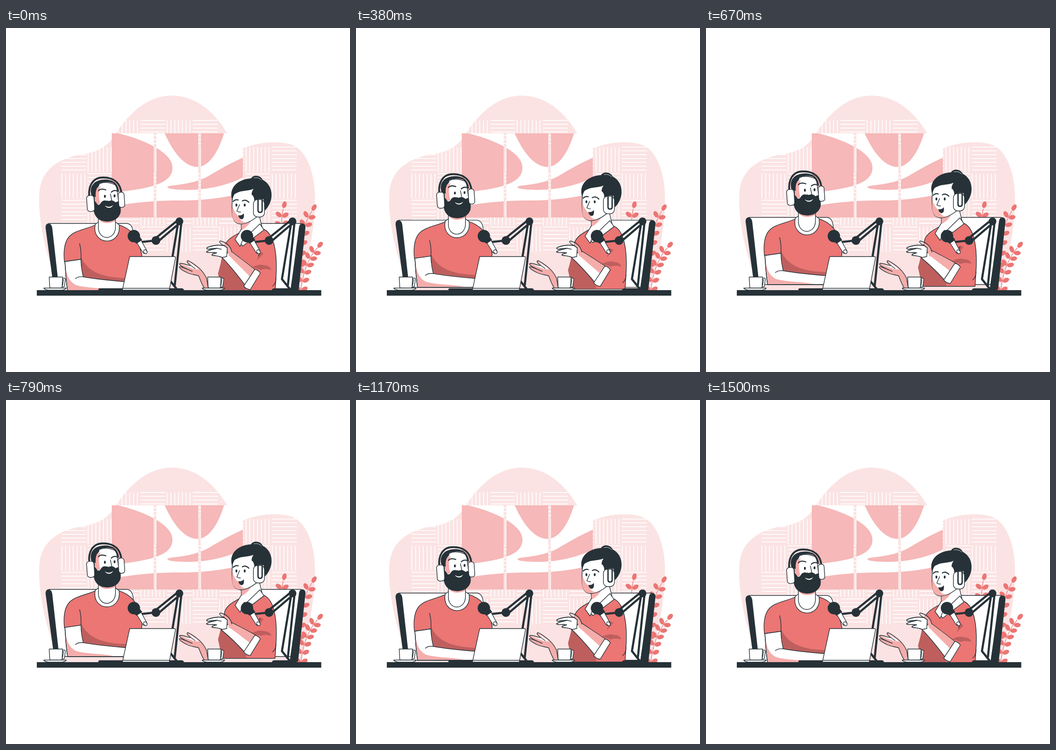
These frames come from a looping animation (748 px wide and 748 px high, 1540 ms). An HTML page:

```html
<!DOCTYPE html>
<html lang="en">
<head>
<meta charset="utf-8">
<title>Podcast</title>
<style>
html, body { margin: 0; width: 100%; height: 100%; overflow: hidden; background: #fff; }
svg { display: block; width: 100%; height: 100%; }
.ink { fill: #263238; }
.coral { fill: #eb7674; }
.deep { fill: #be5f5e; }
.blush { fill: #f5adab; }
.pale { fill: #fbe3e3; }
.art { fill: #f6b8b8; }
.white { fill: #fff; }
.line { stroke: #263238; stroke-width: 1.4; stroke-linejoin: round; stroke-linecap: round; }
.open { fill: none; }
.brow { stroke-width: 2.3; }
.thick { stroke-width: 3; }
.bar { stroke-width: 4.6; }
</style>
</head>
<body>
<svg viewBox="0 0 748 748">
  <defs>
    <path id="blob" d="M115 565C88 500 67 415 73 353C79 306 115 285 158 276C205 270 223 255 239 229C265 190 305 147 360 147C415 147 455 185 481 229L515 262C550 247 595 245 622 254C656 267 672 320 672 370C672 440 655 510 640 570H115Z"/>
    <clipPath id="blobClip"><use href="#blob"/></clipPath>
    <clipPath id="canvases"><path d="M230 229h91v183h-91zM327 229h91v183h-91zM424 229h91v183h-91z"/></clipPath>

    <g id="cup" class="line white">
      <path d="M120 544h7q2 0 2 3l-2 14q0 2-3 2h-4M121 547h4l-2 13h-3"/>
      <path d="M94 541.500h29l-1 21q0 3-4 3H99q-4 0-4-3Z"/>
      <path d="M82 565.500h49q-3 4-9 4.500H92q-7-.5-10-4.500Z"/>
    </g>

    <g id="mic">
      <path class="ink" d="M332 570q1-4 6-4h44q4 0 5 4Z"/>
      <path class="line open bar" d="M374 425L354 546L370 566M381 426L367 559"/>
      <path class="line open bar" d="M376 416L324 458M378 424L332 463M326 462L288 466"/>
      <path class="line white" d="M280 460l10-5 16 29q2 5-3 6q-4 1-6-3Z"/>
      <ellipse class="line white" cx="303" cy="486.500" rx="4.500" ry="3.500" transform="rotate(55 303 486.500)"/>
      <circle class="ink" cx="278" cy="452.500" r="13.500"/>
      <path class="ink" d="M277 464l15-9 4 6-12 8Z"/>
      <circle class="ink" cx="377" cy="420.500" r="8.500"/>
      <circle class="ink" cx="326" cy="462" r="9.500"/>
    </g>
  </defs>

  <use href="#blob" class="pale"/>
  <path id="wall" clip-path="url(#blobClip)" fill="none" stroke="#fff" stroke-width="1.800"/>
  <g clip-path="url(#canvases)">
    <path class="white" d="M230 229h285v183H230Z"/>
    <g class="art">
      <path d="M230 229H244C300 243 362 270 362 304C362 339 310 350 230 358Z"/>
      <path d="M345 229H474C465 260 445 302 416 302C385 302 360 263 345 229Z"/>
      <path d="M351 346C352 340 400 344 440 322C470 304 490 293 515 282V325C480 344 430 352 400 352C370 352 352 350 351 346Z"/>
      <path d="M230 388C285 378 330 375 380 375C430 375 480 369 515 358V412H230Z"/>
    </g>
  </g>

  <g id="plant" class="coral" stroke="#eb7674"></g>

  <g class="lift">
    <path class="line white" d="M93 425H262Q273 425 276 440L292 571H112Z"/>
    <path class="ink" d="M86 434Q86 425 93 425Q99 426 100.500 434L117 582H106Z"/>

    <path class="line coral" d="M197 427C178 437 150 439 137 454C126 467 125 488 127 508L163 503L168 571H290L296 497C290 470 284 440 245 428Z"/>
    <path class="deep" d="M163 497C176 530 210 543 262 544V553L168 541Z"/>
    <path class="line white" d="M128 508C130 530 130 548 134 571H262V552C225 549 190 545 168 541Q163 520 163 503Z"/>
    <path class="blush" d="M129 509C130 532 134 549 152 559C175 566 205 564 235 570H135Q130 540 129 509Z"/>
    <path class="line open" d="M163 503Q164 484 160 469M128 508C130 530 130 548 134 571H262M151 545Q156 540 168 541"/>

    <path class="line white" d="M194 427C185 474 252 476 246 428L238 422H201Z"/>
    <path class="line white" d="M201 400V430C198 464 240 464 238 430V400Z"/>
    <path class="blush" d="M202 405H237V420Q215 430 202 417Z"/>

    <path class="line white" d="M194 345Q212 328 240 342L246 385Q240 408 215 408L192 385Z"/>
    <path class="blush" d="M194 350L206 344Q199 358 205 382L193 385Z"/>
    <path class="line open" style="stroke-width:4" d="M181 366C179 344 188 325 211 325C236 325 249 338 251 360"/>
    <path class="ink" d="M187 367C178 344 193 329.500 215 329.500C235 329.500 245 340 246 358C241 352 239 342 233 337Q217 332 203 338Q204 343 198 348Q194 355 195 367Z"/>
    <path class="ink" d="M190 374Q195 377 199 384Q204 386 207 379Q213 372 222 377Q231 372 238 379Q242 378 246 375Q251 390 249 402Q243 420 220 421Q192 420 190 392Z"/>
    <path class="white" d="M215 386Q224 392 233 385Q230 391 224 391Q218 391 215 386Z"/>
    <path class="line open" d="M227 361L230 375Q227 379 220 376"/>
    <path class="line open brow" d="M201 354Q206 348 217 352M229 357Q235 351 243 355"/>
    <ellipse class="ink" cx="215" cy="366" rx="2" ry="3.200"/>
    <ellipse class="ink" cx="236" cy="365" rx="2" ry="3.200"/>
    <rect class="line white" x="176" y="364" width="16" height="35" rx="6" transform="rotate(-4 184 381)"/>
    <rect class="line white" x="244.500" y="357" width="13" height="33" rx="5.500" transform="rotate(-4 251 373)"/>
  </g>

  <g id="restingHand">
    <path class="line blush" d="M441 572L436 544C431 533 423 524 415 518C407 512 398 506 395 506C391 508 398 515 404 518C395 516 383 510 378 512C375 515 385 520 393 524C384 521 377 517 377 520C379 525 386 528 392 531C400 536 410 536 419 539C423 550 428 562 434 570Z"/>
    <path class="white" d="M397 507.500L414 520L420 525L408 524L380 513L393 516L405 518Z"/>
    <path class="line open" d="M404 518L411 523M393 524L405 529"/>
  </g>

  <g class="lift">
    <path class="line white" d="M545 425H642L619 571H545Z"/>
    <path class="ink" d="M637 434Q638 425 645 425Q652 426 651 435L635 582H617Z"/>

    <path class="line coral" d="M508 445C493 453 481 460 476 472L463 535L470 575H585L587 545C590 500 586 449 561 438Z"/>
    <path class="deep" d="M470 500L461 534L470 574H523L518 553Z"/>
    <path class="deep" d="M535 520Q551 512 561 516Q574 516 577 526Q563 522 554 526ZM553 486L545 506L560 490Z"/>
    <path class="line open" d="M587 543Q587 556 580 561M552 488L549 496"/>

    <path class="line white" d="M511 420L512 437L501 459L515 474L540 455L558 438L550 405Z"/>
    <path class="blush" d="M512 424L535 416Q528 431 513 439Z"/>
    <path class="line white" d="M512 437L498 460L509 475L518 453M552 426L561 439L536 458L524 453Z"/>

    <path class="line white" d="M493 362C490 395 491 412 497 420C505 430 522 427 538 416L560 400L556 360L529 345Z"/>
    <path class="blush" d="M492 386Q497 404 507 410Q511 425 524 422Q504 430 496 419Q490 412 492 386Z"/>
    <path class="ink" d="M492 375C482 345 508 328 533 327C537 319 553 319 558 330C582 342 584 376 563 397L560 372H547L540 382Q541 366 534 362Q534 355 539 349C530 355 510 353 499 359Q494 364 492 375Z"/>
    <path fill="none" stroke="#fff" stroke-width=".8" d="M539 326Q550 324 556 331"/>
    <ellipse class="ink" cx="501" cy="385" rx="2" ry="3.200"/>
    <ellipse class="ink" cx="519" cy="385" rx="2" ry="3.200"/>
    <path class="line open brow" d="M494 377Q499 372 505 374M514 376Q521 372 528 379"/>
    <path class="line open" d="M508 384L502 398Q505 401 510 400"/>
    <path class="ink" d="M505 407Q512 409 517 403Q519 415 512 416Q507 415 505 407Z"/>
    <rect class="line white" x="538" y="373" width="24" height="38" rx="9"/>
    <path class="line open thick" d="M548 372V396Q548 401 552.500 401Q557 401 557 396V372"/>
  </g>

  <g id="forearm">
    <path class="line white" d="M489 485Q515 505 545 528L524 565Q495 525 468 497Z"/>
    <path class="blush" d="M482 477L489 486Q515 505 544 528L535 545Q505 515 484 494Z"/>
  </g>
  <path class="line white lift" d="M541 525Q549 526 553 533L531 569Q522 568 517 561Z"/>
  <path class="white" d="M474 473L480 490L484 496L470 499L456 486Z"/>
  <path class="blush" d="M472 467Q487 472 491 487L487 498L479 477Z"/>
  <path class="line white" d="M446 480C438 482 434 480 438 477C448 473 460 471 474 473L481 478L480 497L470 499C463 495 456 496 448 494C447 492 452 490 458 489C449 487 440 490 436 487C437 484 450 481 459 479Z" stroke="none"/>
  <path class="line open" d="M491 487C488 474 479 466 466 463C462 465 467 470 474 473C460 471 448 473 438 477C434 480 438 482 446 480L459 479C450 481 437 484 436 487C440 490 449 487 458 489C452 490 447 492 448 494C456 496 463 495 470 499M474 473L481 478M459 479L468 481"/>

  <use href="#mic"/>
  <use href="#mic" x="246"/>
  <path class="ink" d="M201 567Q202 566 205 566H355V571H201Z"/>
  <path class="line white" d="M269 497H366Q369 497 368.500 500L355 570H253Z"/>
  <path class="line open" d="M254 566H356"/>
  <use href="#cup"/>
  <use href="#cup" x="344.500"/>
  <rect class="ink" x="67" y="570" width="618.500" height="12"/>
</svg>
<script>
const byId = id => document.getElementById(id);

// Checkered wall tiles: horizontal and vertical stripes in turn.
// The top row is narrower than the rest.
let stripes = "";
for (let row = 0; row < 5; row++)
  for (let col = row ? 0 : 2; col < (row ? 9 : 6); col++)
    for (let i = 0; i < 7; i++) {
      const x = 120.5 + 57.2 * col, y = 201 + 57.9 * row, step = 8.3 * i;
      stripes += (row + col) % 2 ? `M${x} ${y + step}h54` : `M${x + step + 1} ${y}v54`;
    }
byId("wall").setAttribute("d", stripes);

// A curved stem with paired leaves that ends in a single one.
function branch([ax, ay], [bx, by], [cx, cy], pairs) {
  const leaf = (x, y, angle) =>
    `<ellipse cx="9" rx="7.5" ry="4.8" stroke="none" transform="translate(${x} ${y}) rotate(${angle})"/>`;
  let parts = `<path fill="none" stroke-width="1.300" d="M${ax} ${ay}Q${bx} ${by} ${cx} ${cy}"/>`;
  for (let i = 0; i <= pairs; i++) {
    const t = i / pairs, u = 1 - t;
    const x = u * u * ax + 2 * u * t * bx + t * t * cx;
    const y = u * u * ay + 2 * u * t * by + t * t * cy;
    const angle = Math.atan2(u * (by - ay) + t * (cy - by), u * (bx - ax) + t * (cx - bx)) * 180 / Math.PI;
    parts += i < pairs ? leaf(x, y, angle + 55) + leaf(x, y, angle - 55) : leaf(x, y, angle);
  }
  return parts;
}
byId("plant").innerHTML =
  branch([641, 572], [648, 510], [677, 478], 6) +
  branch([636, 520], [638, 440], [665, 398], 6) +
  branch([602, 450], [596, 420], [603, 393], 3);

const LOOP = 1540, PEAK = 735, END = 1500, HEIGHT = 13.5;
const lifted = document.querySelectorAll(".lift");

function draw(now) {
  const t = Math.min(now % LOOP, END);
  const phase = t < PEAK ? t / PEAK : (END - t) / (END - PEAK);
  const rise = HEIGHT * (1 - Math.cos(Math.PI * phase)) / 2;
  for (const part of lifted) part.setAttribute("transform", `translate(0 ${-rise})`);
  // The wrist stays put while the elbow follows the body.
  const skew = -rise / 55;
  byId("forearm").setAttribute("transform", `matrix(1 ${skew} 0 1 0 ${-480 * skew})`);
  requestAnimationFrame(draw);
}
draw(0);
</script>
</body>
</html>
```
